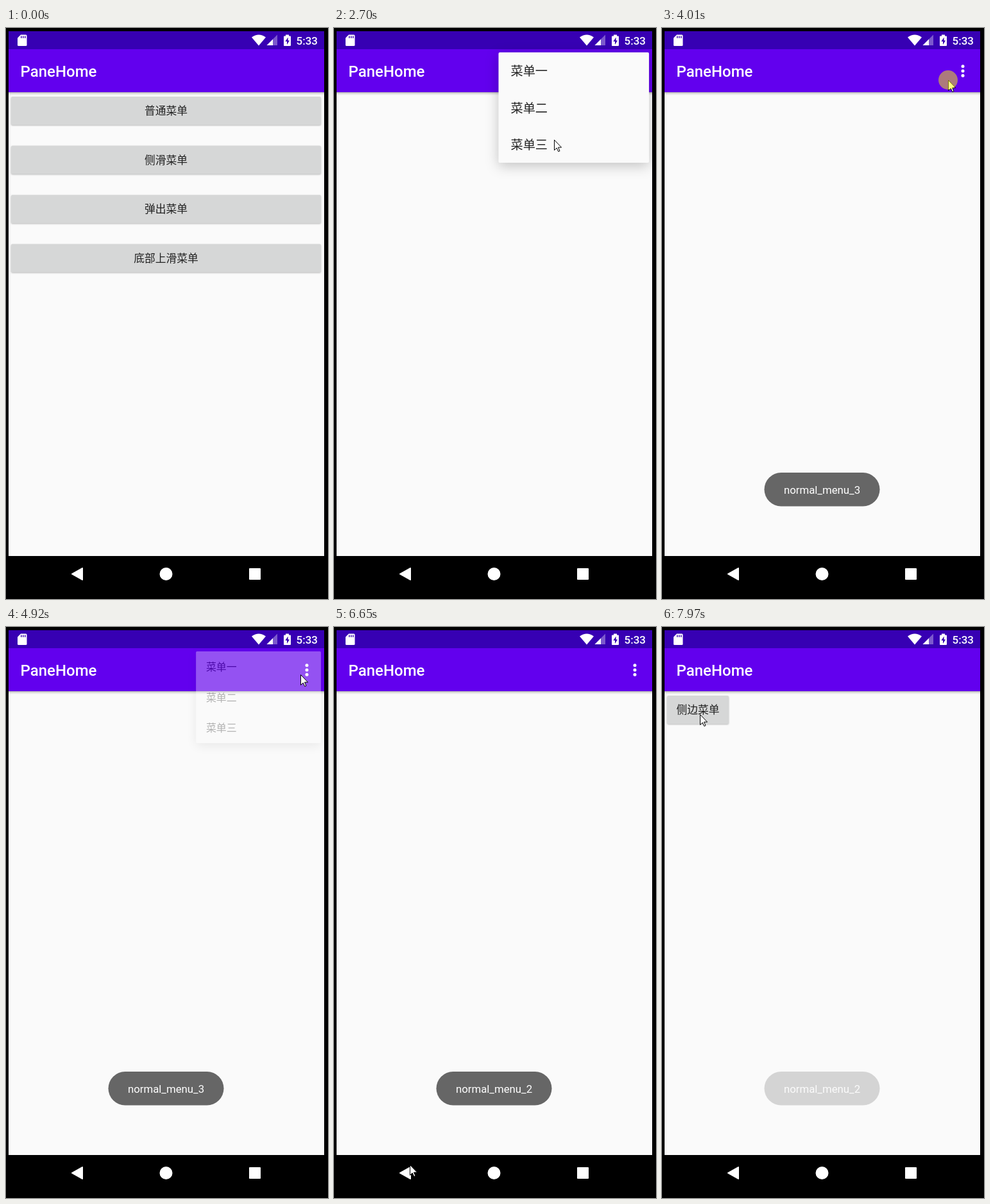
Write an HTML page that moves like this. It is 502x890 px and loops after 8 s.

```html
<!DOCTYPE html>
<html lang="zh">
<head>
<meta charset="utf-8">
<title>Menus</title>
<style>
  html, body { margin: 0; width: 100%; height: 100%; overflow: hidden; background: #000; }
  svg { display: block; width: 502px; height: 890px; }
  text { font-family: Roboto, "Noto Sans CJK SC", "Noto Sans CJK", sans-serif; fill: #212121; }
  .title { font-size: 24px; font-weight: 500; fill: #fff; }
  .clock { font-size: 17px; font-weight: 500; fill: #fff; }
  .label { font-size: 16.8px; text-anchor: middle; }
  .item { font-size: 19.2px; }
  .button { fill: #d6d7d7; filter: drop-shadow(0 1px 1px rgba(0, 0, 0, .26)); }
  .button.down { fill: #c8c9c9; }
  .panel { fill: #fafafa; filter: drop-shadow(0 5px 10px rgba(0, 0, 0, .22)); }
  .toast { font-size: 16.8px; text-anchor: middle; fill: #fff; }
</style>
</head>
<body>
<svg viewBox="0 0 502 890">
  <defs>
    <linearGradient id="shade" x2="0" y2="1">
      <stop stop-color="#000" stop-opacity=".32"/>
      <stop offset=".4" stop-color="#000" stop-opacity=".12"/>
      <stop offset="1" stop-color="#000" stop-opacity="0"/>
    </linearGradient>
    <clipPath id="screen"><rect x="4" y="5" width="492" height="818"/></clipPath>
    <clipPath id="row"><rect id="rowClip" x="256.5" width="234.6" height="57.4"/></clipPath>
  </defs>

  <rect width="502" height="890"/>
  <g clip-path="url(#screen)">
    <rect x="4" y="5" width="492" height="818" fill="#fafafa"/>
    <rect x="4" y="100" width="492" height="5" fill="url(#shade)"/>
    <rect x="4" y="33" width="492" height="67" fill="#6200ee"/>
    <rect x="4" y="5" width="492" height="28" fill="#3700b3"/>
    <text class="title" x="22.5" y="76">PaneHome</text>

    <g id="list"></g>
    <g id="side"></g>
    <g id="dots" fill="#fff">
      <circle cx="469" cy="59.8" r="2.5"/>
      <circle cx="469" cy="67" r="2.5"/>
      <circle cx="469" cy="74.2" r="2.5"/>
    </g>
    <g id="menu">
      <rect class="panel" x="256.5" y="38" width="234.6" height="172" rx="2"/>
      <g id="press" clip-path="url(#row)">
        <rect x="256" y="38" width="236" height="172" fill="#f0f0f0"/>
        <circle id="ripple" cx="351" fill="#e2e2e2"/>
      </g>
      <text class="item" x="275.5" y="74">菜单一</text>
      <text class="item" x="275.5" y="132">菜单二</text>
      <text class="item" x="275.5" y="189">菜单三</text>
    </g>
    <g id="toast">
      <rect x="159.5" y="693" width="180" height="52.5" rx="26.2" fill="#666"/>
      <text class="toast" id="toastText" x="249.5" y="726"></text>
    </g>
  </g>

  <g fill="#fff">
    <path d="M23 10.5H31Q32.5 10.5 32.5 12V26.5Q32.5 28 31 28H19.5Q18 28 18 26.5V15.5Z"/>
    <path d="M23.8 12.5v3.2M26.8 12.5v3.2M29.8 12.5v3.2" stroke="#3700b3" stroke-width="1.5"/>
    <path d="M383 14.5Q394 6.5 405 14.5L394 27.5Z"/>
    <path d="M423 10.5V27H406.5Z" opacity=".35"/>
    <path d="M416 17.5V27H406.5Z"/>
    <path d="M436 10.5h5v2h2q1 0 1 1V27q0 1-1 1h-9q-1 0-1-1V13.5q0-1 1-1h2Z"/>
    <path d="M439.6 14.5L435.4 21H438V26L442 19.4H439.6Z" fill="#3700b3"/>
    <text class="clock" x="452.5" y="26">5:33</text>
    <path d="M103 851L119 842V860Z" stroke="#fff" stroke-width="2" stroke-linejoin="round"/>
    <circle cx="249.5" cy="851" r="10"/>
    <rect x="379" y="842" width="18" height="18" rx="1"/>
  </g>

  <g id="cursor">
    <path d="M.5 .5V16.5L4.2 13L6.8 18.6L9 17.6L6.5 12.1H11.6Z" fill="#fff" stroke="#000"/>
    <circle id="tap" r="15" fill="#ff0" opacity=".48"/>
  </g>
</svg>
<script>
const LOOP = 8000, START = 130, STEP = 77.62;
const ROW = 57.4, TAP = 150, PRESS = 140;

const $ = id => document.getElementById(id);
const set = (id, attrs) => {
  for (const name in attrs) $(id).setAttribute(name, attrs[name]);
};
const ramp = (t, start, length) => Math.min(1, Math.max(0, (t - start) / length));
const ease = k => (1 - Math.cos(Math.PI * k)) / 2;
const within = (t, start, length) => t >= start && t < start + length;

const button = (y, width, label) =>
  `<rect class="button" x="8" y="${y}" width="${width}" height="44" rx="2"/>` +
  `<text class="label" x="${8 + width / 2}" y="${y + 28}">${label}</text>`;
$('list').innerHTML = ['普通菜单', '侧滑菜单', '弹出菜单', '底部上滑菜单']
  .map((label, i) => button(107 + 76.6 * i, 483, label)).join('');
$('side').innerHTML = button(107, 96, '侧边菜单');
const listButtons = $('list').querySelectorAll('rect');

// Eased pointer moves; it rests between them.
const entry = { x: 416, y: 872 };
const moves = [
  { from: 50, to: 890, x: 235, y: 150 },
  { from: 1400, to: 1760, x: 454, y: 90 },
  { from: 1760, to: 2230, x: 467, y: 70 },
  { from: 2440, to: 2690, x: 343, y: 174 },
  { from: 3300, to: 3850, x: 446, y: 81 },
  { from: 4150, to: 4690, x: 459, y: 74 },
  { from: 4850, to: 5330, x: 350, y: 140 },
  { from: 5650, to: 6650, x: 118, y: 838 },
  { from: 6650, to: 6720, x: 110, y: 860 },
  { from: 6880, to: 7260, x: 160, y: 205 },
  { from: 7410, to: 7900, x: 59, y: 136 }
];
const taps = [1050, 2290, 3070, 4000, 4700, 5400, 6720, 7260];

const sessions = [
  { open: 2400, pick: 3150, row: 2 },
  { open: 4800, pick: 5555, row: 1 }
];
const latest = started => sessions.filter(started).pop() || sessions[0];

function pointerAt(t) {
  let { x, y } = entry;
  for (const move of moves) {
    const k = ease(ramp(t, move.from, move.to - move.from));
    x += (move.x - x) * k;
    y += (move.y - y) * k;
  }
  return [Math.round(x), Math.round(y)];
}

function drawMenu(t) {
  const { open, pick, row } = latest(s => t >= s.open);
  const shown = ramp(t, open, 200);
  const top = 38 + ROW * row;
  set('menu', {
    opacity: shown * (1 - ramp(t, pick + PRESS, 160)),
    transform: `translate(491 38) scale(${.75 + .25 * shown}) translate(-491 -38)`
  });
  set('press', { opacity: t >= pick ? 1 : 0 });
  set('rowClip', { y: top });
  set('ripple', { cy: top + 36, r: 13 + Math.max(0, t - pick) * .4 });
}

function drawToast(t) {
  const { pick, row } = latest(s => t >= s.pick + PRESS);
  const gone = ramp(t, pick + 2060, 410);
  $('toastText').textContent = `normal_menu_${row + 1}`;
  set('toast', { opacity: ramp(t, pick + PRESS, 230) * (1 - gone * gone) });
}

function draw(time) {
  const t = START + STEP * Math.floor((time - START) / STEP + .2);
  const inMenu = ramp(t, 1100, 80) - ramp(t, 6880, 110);
  const inSide = ramp(t, 7390, 80);
  set('list', { opacity: 1 - inMenu - inSide });
  set('dots', { opacity: inMenu });
  set('side', { opacity: inSide });
  listButtons[0].classList.toggle('down', within(t, taps[0], TAP));
  listButtons[1].classList.toggle('down', within(t, taps[7], TAP));
  drawMenu(t);
  drawToast(t);
  const [x, y] = pointerAt(t);
  set('cursor', { transform: `translate(${x} ${y})`, opacity: t < START ? 0 : 1 });
  set('tap', { visibility: taps.some(start => within(t, start, TAP)) ? 'visible' : 'hidden' });
}

const origin = performance.now();
function tick() {
  draw((performance.now() - origin) % LOOP);
  requestAnimationFrame(tick);
}
tick();
</script>
</body>
</html>
```
